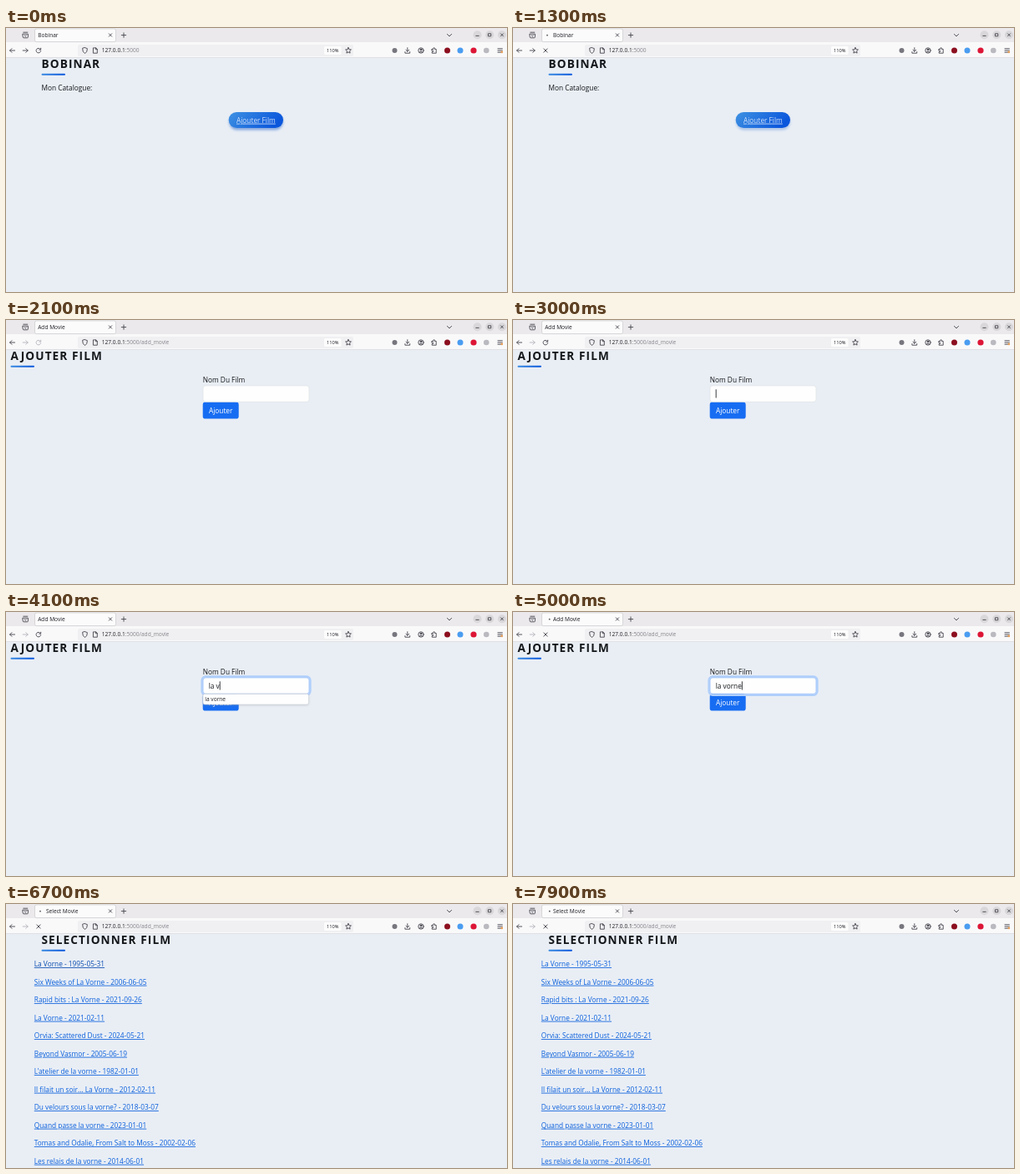
These frames come from a looping animation (600x317 px, 8 s). An HTML page:

```html
<!DOCTYPE html>
<html lang="fr">
<head>
<meta charset="utf-8">
<title>Bobinar</title>
<style>
  html, body { margin: 0; width: 100%; height: 100%; overflow: hidden; background: #e9eef5; }
  svg { display: block; width: 600px; height: 317px; }
  text { font-family: "Open Sans", "Noto Sans", sans-serif; font-size: 8.3px; fill: #14171a; white-space: pre; }
  .ui { font-size: 6.6px; fill: #1f1e26; }
  .dim { fill: #85858c; }
  .zoom { font-size: 5.7px; }
  .h1 { font-size: 13.6px; font-weight: 700; letter-spacing: 1.1px; }
  .link { fill: #0a5fdc; text-decoration: underline; }
  .pill { fill: #cfe0fb; text-decoration: underline; }
  .white { fill: #fff; }
  .icon { fill: none; stroke: #45444d; stroke-width: .9; stroke-linecap: round; stroke-linejoin: round; }
  .off { stroke: #b4b3ba; }
</style>
</head>
<body>
<svg viewBox="0 0 600 317">
  <defs>
    <linearGradient id="blue" x1="0" y1="0" x2="1" y2=".3">
      <stop stop-color="#3f92e2"/><stop offset="1" stop-color="#0b57dc"/>
    </linearGradient>
    <filter id="soft" x="-20%" y="-60%" width="140%" height="220%"><feGaussianBlur stdDeviation="1.8"/></filter>
  </defs>

  <rect y="36" width="600" height="281" fill="#e9eef5"/>

  <g data-on="0-2000">
    <text class="h1" x="42.5" y="48">BOBINAR</text>
    <rect x="42.5" y="54.8" width="28.5" height="2" rx="1" fill="url(#blue)"/>
    <text x="42.5" y="75.2">Mon Catalogue:</text>
    <rect id="shade" x="267" y="103" width="65" height="19.5" rx="9.7" fill="#1c5fc4" filter="url(#soft)"/>
    <rect x="266.7" y="101" width="65.3" height="19" rx="9.5" fill="url(#blue)"/>
    <text class="pill" x="299.4" y="113.7" text-anchor="middle">Ajouter Film</text>
  </g>

  <g data-on="2000-5200">
    <text class="h1" x="5.5" y="48">AJOUTER FILM</text>
    <rect x="5.5" y="54.8" width="28.5" height="2" rx="1" fill="url(#blue)"/>
    <text x="235.7" y="75.2">Nom Du Film</text>
    <rect x="235.7" y="98.6" width="43" height="20" rx="3.2" fill="#176df2"/>
    <text class="white" x="257.2" y="111.7" text-anchor="middle">Ajouter</text>
    <rect id="glow" x="234.5" y="77.4" width="130" height="22.4" rx="4.5" fill="none" stroke="#b0cffb" stroke-width="2.2"/>
    <rect id="field" x="236" y="78.9" width="127" height="19.4" rx="3" fill="#fefefe" stroke="#dee2e6" stroke-width=".7"/>
    <text id="typed" x="242.7" y="91.5"></text>
    <rect id="caret" y="83.3" width=".9" height="10.2" fill="#212529"/>
    <g data-on="3700-4800">
      <rect x="236" y="99" width="126.5" height="13" rx="2.5" fill="#8a8f9a" opacity=".35" filter="url(#soft)"/>
      <rect x="236" y="98.4" width="126.4" height="12.6" rx="2" fill="#fefefe" stroke="#cfd1d6" stroke-width=".6"/>
      <text class="ui" x="238.3" y="107.2">la vorne</text>
    </g>
  </g>

  <g id="results" data-on="5200-8000">
    <text class="h1" x="42.5" y="48">SELECTIONNER FILM</text>
    <rect x="42.5" y="54.8" width="28.5" height="2" rx="1" fill="url(#blue)"/>
  </g>

  <!-- browser chrome -->
  <rect width="600" height="18" fill="#ebe9eb"/>
  <rect y="17" width="600" height="18.6" fill="#f9f9fa"/>
  <rect y="35.3" width="600" height=".7" fill="#d8d8dc"/>
  <rect x="34.5" y="1" width="97" height="15.6" rx="2" fill="#fbfbfb" stroke="#cbcacd" stroke-width=".7"/>
  <rect x="86" y="20" width="330" height="14" rx="2" fill="#f0f0f2"/>
  <rect x="381" y="22" width="20.5" height="10" rx="1.5" fill="#fcfcfc"/>
  <text id="tab" class="ui" y="10.9"></text>
  <circle id="dot" cy="8.7" r=".9" fill="#55555f"/>
  <text class="ui" x="114.8" y="29.4">127.0.0.1<tspan id="path" class="dim"></tspan></text>
  <text class="ui zoom" x="391.2" y="29.2" text-anchor="middle">110%</text>

  <g class="icon">
    <path d="M20.2 7.2h6.2v3.6q0 1-1 1h-4.2q-1 0-1-1zM20.8 5.2h5M22.3 9l1 .9 1-.9"/>
    <path d="M123.3 6.8l3.4 3.4m0-3.4l-3.4 3.4M138.3 8.6h5.4M141 5.9v5.4"/>
    <path d="M528.4 7.4l2.6 2.6 2.6-2.6"/>
    <path d="M4.6 27h6M7 24.6L4.6 27 7 29.4"/>
    <path id="next" d="M20.2 27h6M23.8 24.6l2.4 2.4-2.4 2.4"/>
    <path id="reload" d="M41.3 25.6a2.8 2.8 0 1 0 .4 2M41.7 24.2v1.9h-1.9"/>
    <path id="stop" d="M36.8 24.9l4.3 4.3m0-4.3l-4.3 4.3"/>
    <path d="M94.5 23.6l2.9 1.1q.1 4.6-2.9 5.8-3-1.2-2.9-5.8z"/>
    <path d="M104.8 23.9h2.9l1.6 1.6v4.7h-4.5zM107.5 24v1.7h1.7"/>
    <path d="M410 23.5l1 2.2 2.4.3-1.8 1.7.5 2.4-2.1-1.2-2.1 1.2.5-2.4-1.8-1.7 2.4-.3z"/>
    <path d="M480.8 23.7v4.4m-1.9-1.8l1.9 1.8 1.9-1.8M477.9 28.6v1.6h5.8v-1.6"/>
    <circle cx="497" cy="27" r="3.2"/><circle cx="497" cy="26" r="1" fill="#45444d"/><path d="M495.1 29q1.9-1.6 3.8 0"/>
    <path d="M510.2 25.4h1.6q-.6-1.7.8-1.7t.8 1.7h1.8v4.8h-5v-1.6q1.6.5 1.6-.8t-1.6-.8z"/>
    <path d="M589 24.8h5.4M589 27h5.4M589 29.2h5.4"/>
  </g>
  <circle cx="593.8" cy="28.9" r="1.4" fill="#e9a25c"/>
  <circle cx="465.5" cy="27" r="3" fill="#77767e"/>
  <circle cx="528.5" cy="27" r="3.5" fill="#8c0f1f"/>
  <circle cx="544" cy="27" r="3.5" fill="#4a9cf0"/>
  <circle cx="560" cy="27" r="3.6" fill="#dd1636"/>
  <circle cx="575.3" cy="27" r="3.3" fill="#b9b9bf"/>
  <g fill="#d9d7d9"><circle cx="564.5" cy="8.3" r="5"/><circle cx="579.3" cy="8.3" r="5"/><circle cx="594" cy="8.3" r="5"/></g>
  <path class="icon" d="M562.8 9.4h3.4M577.8 6.8h3v3h-3zM592.5 6.8l3 3m0-3l-3 3"/>
</svg>

<script>
const LOOP = 8000;
const $ = id => document.getElementById(id);
const show = (el, on) => el.setAttribute('visibility', on ? 'inherit' : 'hidden');
const within = (t, a, b) => t >= a && t < b;
const ramp = (t, a, b) => Math.min(1, Math.max(0, (t - a) / (b - a)));

const films = [
  'La Vorne - 1995-05-31',
  'Six Weeks of La Vorne - 2006-06-05',
  'Rapid bits : La Vorne - 2021-09-26',
  'La Vorne - 2021-02-11',
  'Orvia: Scattered Dust - 2024-05-21',
  'Beyond Vasmor - 2005-06-19',
  "L'atelier de la vorne - 1982-01-01",
  'Il filait un soir... La Vorne - 2012-02-11',
  'Du velours sous la vorne? - 2018-03-07',
  'Quand passe la vorne - 2023-01-01',
  'Tomas and Odalie, From Salt to Moss - 2002-02-06',
  'Les relais de la vorne - 2014-06-01'
];
const links = films.map((film, i) => {
  const el = document.createElementNS('http://www.w3.org/2000/svg', 'text');
  el.setAttribute('class', 'link');
  el.setAttribute('x', 33.8);
  el.setAttribute('y', 75.2 + i * 21.5);
  el.textContent = film;
  return $('results').appendChild(el);
});

const query = 'la vorne';
const keys = [3600, 3700, 3900, 4000, 4200, 4300, 4400, 4600];
const loads = [[1300, 2000, 1800], [4800, 5200, 5200], [6700, 8000, 8000]]; // start, end, stop icon until
const timed = [...document.querySelectorAll('[data-on]')]
  .map(el => [el, ...el.dataset.on.split('-').map(Number)]);

function draw(now) {
  const t = Math.floor(now % LOOP / 100) * 100;
  for (const [el, a, b] of timed) show(el, within(t, a, b));

  const load = loads.find(([a, b]) => within(t, a, b));
  const stopping = !!load && t < load[2];
  $('tab').textContent = t < 2000 ? 'Bobinar' : t < 5200 ? 'Add Movie' : 'Select Movie';
  $('tab').setAttribute('x', load ? 48 : 38.2);
  show($('dot'), load);
  if (load) $('dot').setAttribute('cx', 41 + 2.8 * Math.sin((t - load[0]) / 960 * 2 * Math.PI));

  $('path').textContent = t < 2000 ? ':5000' : ':5000/add_movie';
  $('next').classList.toggle('off', t >= 2000);
  $('reload').classList.toggle('off', within(t, 2000, 2400) || within(t, 5200, 5800));
  show($('reload'), !stopping);
  show($('stop'), stopping);

  $('shade').setAttribute('opacity', .5 - .2 * ramp(t, 0, 300));

  const focus = ramp(t, 3000, 3200);
  $('glow').setAttribute('opacity', focus);
  $('field').setAttribute('stroke', focus > .4 ? '#86b7fe' : '#dee2e6');
  const typed = $('typed');
  typed.textContent = query.slice(0, keys.filter(k => t >= k).length);
  $('caret').setAttribute('x', 242.7 + (typed.textContent ? typed.getComputedTextLength() : 0));
  show($('caret'), within(t, 3000, 5200));

  links[0].style.fill = within(t, 6100, 7800) ? '#084bb0' : '';
}

const start = performance.now();
(function tick() {
  draw(performance.now() - start);
  requestAnimationFrame(tick);
})();
</script>
</body>
</html>
```
